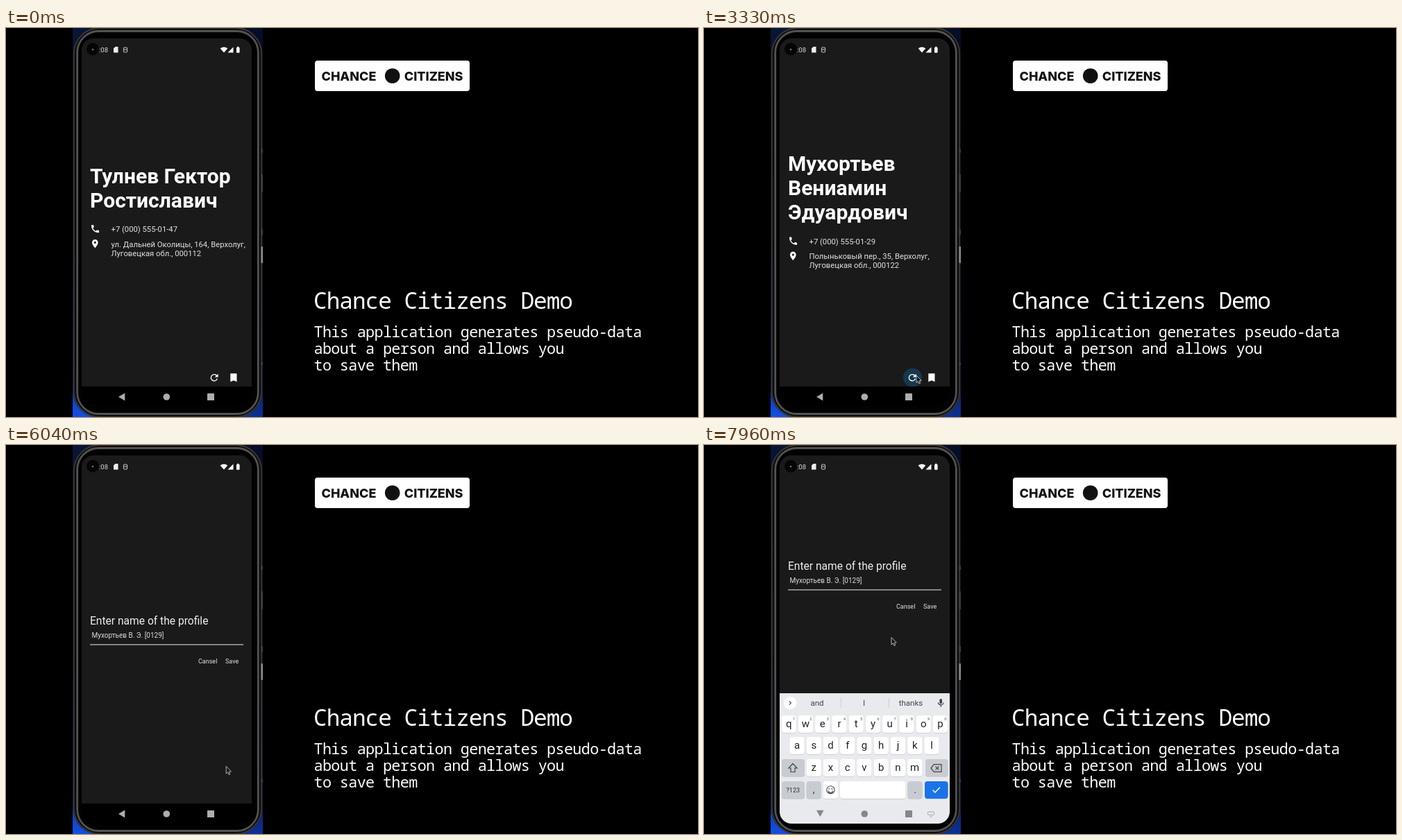
Recreate the animation shown at these times as an HTML page with a canvas. Size 997x561 px, loop 8 s.

```html
<!DOCTYPE html>
<html lang="en">
<head>
<meta charset="utf-8">
<title>App demo</title>
<style>
html, body { margin: 0; width: 100%; height: 100%; overflow: hidden; background: #000; }
canvas { display: block; width: 997px; height: 561px; }
</style>
</head>
<body>
<canvas id="stage" width="997" height="561"></canvas>
<script>
const ctx = document.getElementById('stage').getContext('2d');
const LOOP = 8000, TAU = Math.PI * 2;
const SANS = 'Roboto, sans-serif', MONO = '"Noto Sans Mono", monospace';
const PANEL = '#1a1a1a';

const people = [
  { from: 0, name: ['Тулнев Гектор', 'Ростиславич'], phone: '+7 (000) 555-01-47',
    address: ['ул. Дальней Околицы, 164, Верхолуг,', 'Луговецкая обл., 000112'] },
  { from: 2500, name: ['Лубенин', 'Станимир', 'Захарович'], phone: '+7 (000) 555-01-86',
    address: ['26-й Просек, 7, Верхолуг, Луговецкая', 'обл., 000104'] },
  { from: 3330, name: ['Мухортьев', 'Вениамин', 'Эдуардович'], phone: '+7 (000) 555-01-29',
    address: ['Полыньковый пер., 35, Верхолуг,', 'Луговецкая обл., 000122'] }
];
const taps = [
  { at: 2460, x: 287 }, { at: 3290, x: 287 }, { at: 4200, x: 314.5 }
];
const MODAL_AT = 5012, FOCUS_AT = 6690, KEYS_AT = 7500;
// time, x, y of the pointer tip
const track = [
  [1080, 359, 457], [1720, 306, 501], [3720, 306, 501], [4020, 327, 501],
  [5830, 327, 502], [6630, 270, 277.5]
];

const clamp = v => Math.min(1, Math.max(0, v));
const easeOut = v => 1 - (1 - v) ** 2;
const smooth = v => v * v * (3 - 2 * v);

function box(x, y, w, h, fill, r = 0) {
  ctx.beginPath();
  ctx.roundRect(x, y, w, h, r);
  ctx.fillStyle = fill;
  ctx.fill();
}
function ring(x, y, w, h, r, color, width) {
  ctx.beginPath();
  ctx.roundRect(x, y, w, h, r);
  ctx.strokeStyle = color;
  ctx.lineWidth = width;
  ctx.stroke();
}
function disc(x, y, r, fill) {
  ctx.beginPath();
  ctx.arc(x, y, r, 0, TAU);
  ctx.fillStyle = fill;
  ctx.fill();
}
function trace(points, close) {
  ctx.beginPath();
  points.forEach(([x, y]) => ctx.lineTo(x, y));
  if (close) ctx.closePath();
}
function poly(points, fill) {
  trace(points, true);
  ctx.fillStyle = fill;
  ctx.fill();
}
function line(points, color, width = 1, close = false) {
  trace(points, close);
  ctx.strokeStyle = color;
  ctx.lineWidth = width;
  ctx.stroke();
}
function text(s, x, y, font, color, align = 'left', spacing = 0) {
  ctx.font = font;
  ctx.fillStyle = color;
  ctx.textAlign = align;
  ctx.letterSpacing = spacing + 'px';
  ctx.fillText(s, x, y);
}
function fade(x0, y0, x1, y1, ...stops) {
  const g = ctx.createLinearGradient(x0, y0, x1, y1);
  stops.forEach(([at, color]) => g.addColorStop(at, color));
  return g;
}

const phonePath = new Path2D('M6.62 10.79c1.44 2.83 3.76 5.14 6.59 6.59l2.2-2.2c.27-.27.67-.36 1.02-.24 1.12.37 2.33.57 3.57.57.55 0 1 .45 1 1V20c0 .55-.45 1-1 1C10.6 21 3 13.4 3 4c0-.55.45-1 1-1h3.5c.55 0 1 .45 1 1 0 1.25.2 2.45.57 3.57.11.35.03.74-.25 1.02z');
const pinPath = new Path2D('M12 2C8.13 2 5 5.13 5 9c0 5.25 7 13 7 13s7-7.75 7-13c0-3.87-3.13-7-7-7zm0 9.5a2.5 2.5 0 1 1 0-5 2.5 2.5 0 0 1 0 5z');

function icon(path, cx, cy, scale) {
  ctx.save();
  ctx.translate(cx, cy);
  ctx.scale(scale, scale);
  ctx.translate(-12, -12);
  ctx.fillStyle = '#fff';
  ctx.fill(path, 'evenodd');
  ctx.restore();
}

function drawCaption() {
  box(445, 47, 223, 44, '#fff', 4);
  const brand = '800 18px Inter, sans-serif';
  text('CHANCE', 454.5, 76, brand, '#111');
  text('CITIZENS', 658.5, 76, brand, '#111', 'right');
  disc(556.7, 69, 10.8, '#111');
  text('Chance Citizens Demo', 443, 405, '32.75px ' + MONO, '#fff', 'left', -1);
  ['This application generates pseudo-data', 'about a person and allows you', 'to save them']
    .forEach((s, i) => text(s, 443.5, 446 + i * 24, '21.8px ' + MONO, '#fff', 'left', -0.65));
}

function drawBody() {
  box(96, 0, 274, 561, fade(0, 0, 0, 561,
    [0, '#081636'], [0.5, '#04091c'], [0.88, '#0a2a98'], [1, '#1450e4']));
  box(96, 0, 274, 561, fade(96, 0, 370, 0, [0, 'rgba(0,0,20,0)'], [1, 'rgba(0,0,20,0.4)']));
  box(96.5, -1, 273, 563, '#0b0b0b', 38);
  ring(97.8, 0, 270.4, 561, 37, '#383838', 2);
  ring(102.7, 4.5, 260.6, 552, 31, '#525252', 2.8);
  box(104.5, 6.5, 257, 548, '#020202', 28);
  [[174, 6], [211, 26], [290, 9], [315, 24], [482, 4]].forEach(([y, h], i) =>
    box(367.5, y, 2.5, h, i === 3 ? '#8c8c8c' : '#3f3f3f', 1));
}

function drawStatus() {
  text(':08', 147, 35, '9.5px ' + SANS, '#ddd', 'right');
  disc(125, 30.5, 9, '#050505');
  disc(125, 31, 1.3, '#777');
  poly([[157.5, 27], [161.5, 27], [161.5, 35.5], [155, 35.5], [155, 29.5]], '#eee');
  ring(169.5, 28, 5, 7, 1.5, '#bbb', 1.2);
  box(170.5, 30.5, 3, 1.2, '#bbb');
  ctx.beginPath();
  ctx.moveTo(314, 35.5);
  ctx.arc(314, 35.5, 8, -2.3, -0.85);
  ctx.fillStyle = '#fff';
  ctx.fill();
  poly([[319.5, 35.5], [327.5, 35.5], [327.5, 27.5]], '#fff');
  box(332, 28, 4.6, 7.8, '#fff', 0.8);
  box(333.3, 26.8, 2, 1.5, '#fff');
}

function drawPerson(t) {
  const who = people.filter(p => t >= p.from).pop();
  const small = '11.25px ' + SANS;
  let y = who.name.length === 2 ? 223.5 : 206;
  who.name.forEach((s, i) => text(s, 121, y + i * 35.1, 'bold 30px ' + SANS, '#fff'));
  y += (who.name.length - 1) * 35.1 + 35.3;
  icon(phonePath, 128.5, y - 4.3, 0.62);
  text(who.phone, 151.5, y, small, '#e2e2e2');
  icon(pinPath, 128.3, y + 17.3, 0.62);
  who.address.forEach((s, i) => text(s, 151.5, y + 21.8 + i * 13, small, '#e2e2e2'));
}

function drawActions(t) {
  taps.forEach(({ at, x }) => {
    const age = t - at;
    if (age < 0 || age > 520) return;
    ctx.save();
    ctx.beginPath();
    ctx.rect(x, 491, 27, 26);
    ctx.clip();
    ctx.globalAlpha = clamp((520 - age) / 320);
    disc(x + 13.5, 504, 5 + 15 * easeOut(clamp(age / 120)), '#16384e');
    ctx.restore();
  });
  ctx.beginPath();
  ctx.arc(300, 504.2, 4.6, 0.35, -0.75 + TAU);
  ctx.strokeStyle = '#fff';
  ctx.lineWidth = 1.4;
  ctx.stroke();
  poly([[305.6, 498.8], [305.6, 503.6], [300.8, 503.6]], '#fff');
  poly([[323.3, 498.3], [332.5, 498.3], [332.5, 510.3], [327.9, 508.2], [323.3, 510.3]], '#fff');
}

function drawModal(t) {
  if (t < MODAL_AT) return;
  const dy = 531 * (1 - easeOut(clamp((t - MODAL_AT) / 300)));
  const lift = t >= KEYS_AT + 40 ? -79 : 0;
  const focused = t >= FOCUS_AT && t < KEYS_AT + 40;
  ctx.save();
  ctx.translate(0, dy);
  box(109, 38, 245, 479, PANEL);
  ctx.translate(0, lift);
  text('Enter name of the profile', 121, 259, '15.6px ' + SANS, '#eee');
  text('Мухортьев В. Э. [0129]', 123.5, 278.3, '10px ' + SANS, '#ddd');
  box(121, 287.2, 221, 1.2, focused ? '#cfcbf2' : '#c4c4c4');
  text('Cansel', 277, 315, '9px ' + SANS, '#e4e4e4');
  text('Save', 316, 315, '9px ' + SANS, '#e4e4e4');
  ctx.restore();
}

function drawKey(x, y, w, fill = '#fff') {
  box(x, y + 0.8, w, 25, '#c3c6cb', 4);
  box(x, y, w, 25, fill, 4);
}
function letterRow(letters, cx, y, digits) {
  [...letters].forEach((c, i) => {
    const x = cx + i * 24.25;
    drawKey(x - 10.6, y, 21.2);
    text(c, x, y + 17.2, '15px ' + SANS, '#222', 'center');
    if (digits) text(String((i + 1) % 10), x + 7.5, y + 7, '6px ' + SANS, '#555', 'center');
  });
}

function drawKeyboard(t) {
  if (t < KEYS_AT) return;
  const ink = '#444', grey = '#c8ccd2';
  ctx.save();
  ctx.translate(0, 190 * (1 - easeOut(clamp((t - KEYS_AT) / 260))));
  box(109, 358, 245, 190, '#e8eaee');
  disc(124, 372, 9.3, '#fff');
  line([[122.7, 369.3], [125.4, 372], [122.7, 374.7]], ink, 1.1);
  [['and', 163], ['I', 230.5], ['thanks', 298]].forEach(([s, x]) =>
    text(s, x, 376.2, '11.5px ' + SANS, ink, 'center'));
  [197, 266].forEach(x => box(x, 365, 0.8, 14, '#c4c7cc'));
  box(339.4, 366, 3.6, 7.2, ink, 1.8);
  ctx.beginPath();
  ctx.arc(341.2, 371, 3.9, 0.1, Math.PI - 0.1);
  ctx.strokeStyle = ink;
  ctx.lineWidth = 1.1;
  ctx.stroke();
  box(340.7, 375, 1.1, 3, ink);

  letterRow('qwertyuiop', 122.2, 390, true);
  letterRow('asdfghjkl', 134, 421);
  letterRow('zxcvbnm', 158.2, 453);

  drawKey(112, 453, 33, grey);
  line([[128, 459.5], [134, 466], [131, 466], [131, 471.5], [125, 471.5], [125, 466], [122, 466]], ink, 1.2, true);
  drawKey(319, 453, 32.5, grey);
  line([[327, 466], [331.3, 460.7], [342, 460.7], [342, 471.3], [331.3, 471.3]], ink, 1.2, true);
  line([[333.5, 463.5], [338.5, 468.5]], ink, 1.1);
  line([[338.5, 463.5], [333.5, 468.5]], ink, 1.1);

  drawKey(112, 485, 33, grey);
  text('?123', 128.3, 500.6, '9px ' + SANS, '#333', 'center');
  drawKey(147.6, 485, 21.2, grey);
  text(',', 158.2, 502, '14px ' + SANS, '#333', 'center');
  drawKey(171.8, 485, 21.2);
  ctx.beginPath();
  ctx.arc(182.4, 497.3, 5.6, 0, TAU);
  ctx.moveTo(185.4, 498.5);
  ctx.arc(182.4, 498.5, 3, 0, Math.PI);
  ctx.strokeStyle = ink;
  ctx.lineWidth = 1.1;
  ctx.stroke();
  disc(180.4, 495.8, 0.9, ink);
  disc(184.4, 495.8, 0.9, ink);
  drawKey(196, 485, 94.5);
  drawKey(293.3, 485, 21.2, grey);
  text('.', 304, 502, '14px ' + SANS, '#333', 'center');
  drawKey(318, 485, 33.5, '#1a73e8');
  line([[329.5, 497.5], [333, 501], [340, 493.8]], '#fff', 1.5);
  ring(322.5, 529, 9, 4.5, 1, '#a3a6aa', 1);
  line([[325, 535], [327, 537], [329, 535]], '#a3a6aa', 1);
  ctx.restore();
}

function drawNav(t) {
  const keys = t >= KEYS_AT + 60;
  const color = keys ? '#85878b' : '#adadad';
  poly(keys ? [[162, 526.8], [172.6, 526.8], [167.3, 536.2]]
            : [[171.3, 526.6], [171.3, 537.4], [162, 532]], color);
  disc(231.3, 532, 4.8, color);
  box(290, 527, 10, 10, color, 0.6);
}

function drawPointer(t) {
  if (t < track[0][0]) return;
  let i = 0;
  while (i < track.length - 2 && t >= track[i + 1][0]) i++;
  const [t0, x0, y0] = track[i], [t1, x1, y1] = track[i + 1];
  const raw = clamp((t - t0) / (t1 - t0));
  const k = i === 0 ? easeOut(raw) : smooth(raw);
  ctx.save();
  ctx.translate(x0 + (x1 - x0) * k, y0 + (y1 - y0) * k);
  const arrow = [[0, 0], [0, 10.5], [2.4, 8.4], [4, 12], [5.7, 11.2], [4.2, 7.8], [7.2, 7.4]];
  poly(arrow, '#151515');
  line(arrow, '#c8c8c8', 0.9, true);
  ctx.restore();
}

function draw(t) {
  box(0, 0, 997, 561, '#000');
  drawCaption();
  drawBody();
  ctx.save();
  ctx.beginPath();
  ctx.roundRect(109, 15, 245, 531, 17);
  ctx.clip();
  box(109, 15, 245, 531, PANEL);
  box(109, 517, 245, 30, '#000');
  drawPerson(t);
  drawActions(t);
  drawModal(t);
  drawStatus();
  drawKeyboard(t);
  drawNav(t);
  ctx.restore();
  drawPointer(t);
}

const start = performance.now();
function tick() {
  draw((performance.now() - start) % LOOP);
  requestAnimationFrame(tick);
}
tick();
</script>
</body>
</html>
```
